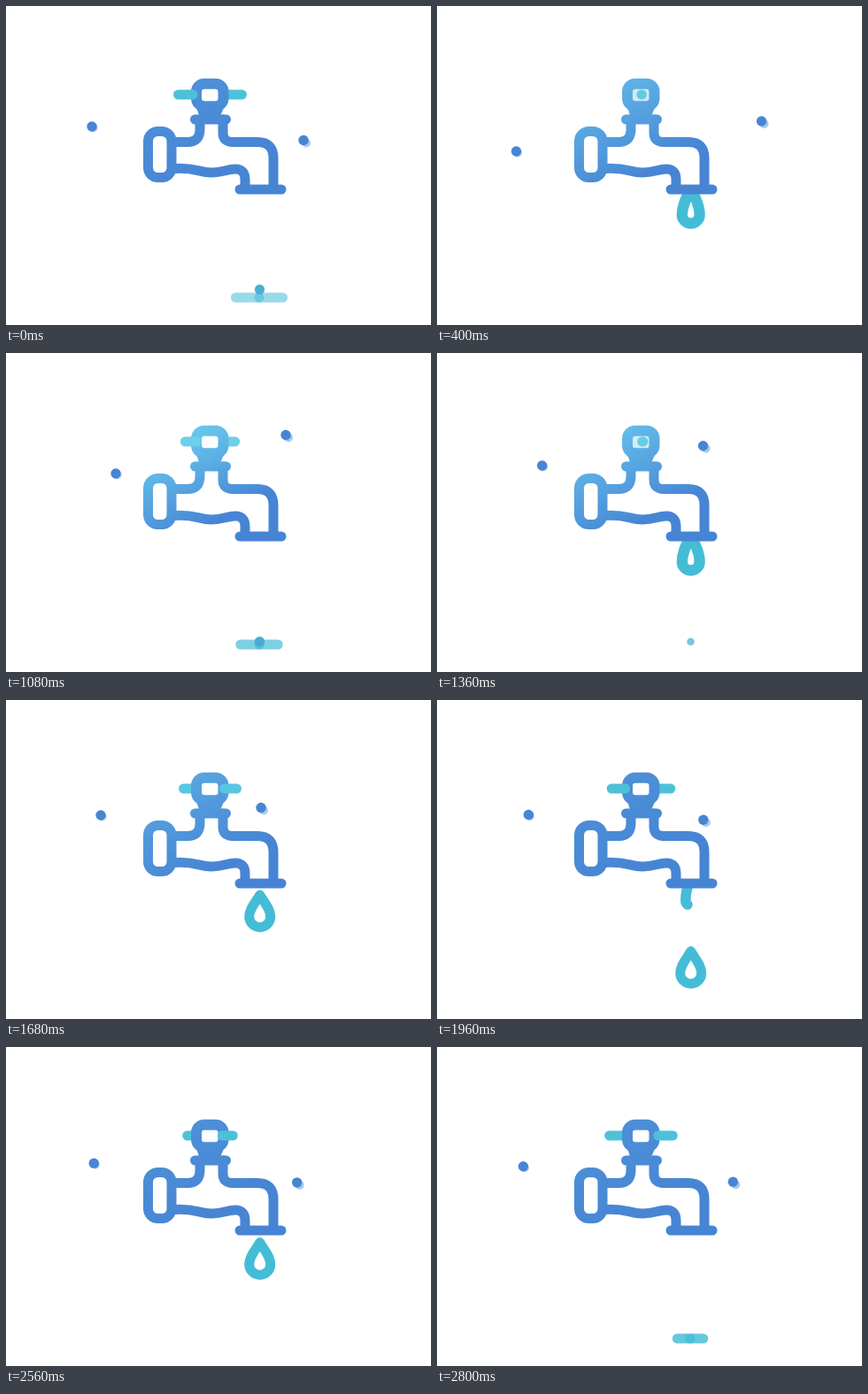
An HTML page for the animation above (2840 ms loop, 480x360 px).

```html
<!DOCTYPE html>
<html lang="en">
<head>
<meta charset="utf-8">
<title>Dripping tap</title>
<style>
  html, body { margin: 0; width: 100%; height: 100%; overflow: hidden; background: #fff; }
  svg { display: block; width: 100vw; height: 100vh; }
  .line { fill: none; stroke-width: 11; stroke-linecap: round; stroke-linejoin: round; }
  .water { stroke: #45bcd6; }
  .dot { fill: #4785d4; }
  .echo { fill: #a9c9ee; }
</style>
</head>
<body>
<svg viewBox="0 0 480 360">
  <defs>
    <linearGradient id="metal" gradientUnits="userSpaceOnUse" x1="200" y1="85" x2="250" y2="182">
      <stop id="shine" offset="0"/>
      <stop offset="1" stop-color="#4785d4"/>
    </linearGradient>
    <clipPath id="below"><path d="M0 207H480V360H0Z"/></clipPath>
  </defs>
  <g id="drips" clip-path="url(#below)"></g>
  <g id="back"></g>
  <g class="line" stroke="url(#metal)">
    <rect x="160.500" y="141.500" width="26.500" height="52" rx="11"/>
    <path d="M190 153.500H205Q219 153.500 219 139V128M245 128V143Q245 153.500 256 153.500H284Q302 153.500 302 172V206"/>
    <path d="M190 183.500C214 182 218 188 232 188S249 184 259 184Q270 184 270 196V206"/>
    <path d="M213.500 128H248.500M264 207H311"/>
    <path d="M221 115H240L236 124H224Z"/>
    <rect id="knob" x="215" y="87.700" width="30.500" height="25.500" rx="9" stroke-width="12"/>
  </g>
  <g id="front"></g>
  <g id="dots"></g>
</svg>
<script>
const LOOP = 2840, STEP = 40;
const SPLASHES = [1020, 1980, 2760];

const $ = id => document.getElementById(id);
const clamp = v => Math.min(1, Math.max(0, v));
const lerp = (a, b, k) => a + (b - a) * k;
const mix = (a, b, k) => `rgb(${a.map((v, i) => Math.round(lerp(v, b[i], k)))})`;
const easeOut = k => Math.sin(k * Math.PI / 2);

function set(el, attrs) {
  for (const key in attrs) el.setAttribute(key, attrs[key]);
  return el;
}
function add(parent, tag, attrs) {
  const el = document.createElementNS("http://www.w3.org/2000/svg", tag);
  parent.append(el);
  return set(el, attrs);
}

// Closed smooth curve through [time, x, y] keys.
function along(keys, t) {
  const n = keys.length;
  const key = j => {
    const [at, x, y] = keys[(j + n) % n];
    return [at + LOOP * Math.floor(j / n), x, y];
  };
  const i = keys.findLastIndex(k => k[0] <= t);
  const [p, a, b, q] = [-1, 0, 1, 2].map(d => key(i + d));
  const h = b[0] - a[0], u = (t - a[0]) / h;
  return [1, 2].map(c => {
    const m = h * (b[c] - p[c]) / (b[0] - p[0]);
    const k = h * (q[c] - a[c]) / (q[0] - a[0]);
    const d = b[c] - a[c];
    return a[c] + u * (m + u * (3 * d - 2 * m - k + u * (m + k - 2 * d)));
  });
}

const dots = [
  { lag: 1.5, keys: [[0, 97, 136], [400, 89.5, 164], [720, 95, 210], [1080, 124, 136], [1680, 107, 130], [2280, 101, 130.5]] },
  { lag: 3, keys: [[0, 336, 151.5], [400, 366.5, 130], [560, 330, 99], [720, 318, 93], [1080, 316, 92.5], [1680, 288, 121.5], [2280, 322, 148]] }
];
for (const d of dots) {
  d.echo = add($("dots"), "circle", { class: "echo", r: 5 });
  d.dot = add($("dots"), "circle", { class: "dot", r: 5.7 });
}
const bars = ["back", "front"].map(id => add($(id), "line", { class: "line", y1: 100, y2: 100 }));
const drips = SPLASHES.map(at => {
  const shape = (tag, attrs) => add($("drips"), tag, attrs);
  const half = () => shape("line", { class: "line water", x1: 286, y1: 329, y2: 329 });
  return {
    at,
    pool: [half(), half()],
    hop: shape("circle", { cx: 286.5, fill: "#48aad2" }),
    drop: shape("path", { class: "line water", pathLength: 1 })
  };
});

function dropPath(tip, y, r) {
  const x = 286.7, bend = (y - tip) * .35;
  return `M${x} ${tip}C${x - 5} ${tip + bend} ${x - r} ${y - bend} ${x - r} ${y}` +
    `A${r} ${r} 0 0 0 ${x + r} ${y}C${x + r} ${y - bend} ${x + 5} ${tip + bend} ${x} ${tip}`;
}

// s is the time relative to the splash: grow, settle, fall, spread, bounce.
function drawDrip({ at, pool, hop, drop }, t) {
  const s = (t - at + 940 + LOOP) % LOOP - 940;
  const grow = clamp((s + 930) / 450);
  const settle = clamp((s + 480) / 180);
  const fall = 77 * clamp((s + 220) / 220) ** 2;
  const tip = lerp(201, 208, grow) + 12 * settle + fall;
  const belly = lerp(220, 242.5, grow) + 2 * settle + fall;
  set(drop, {
    d: dropPath(tip, belly, lerp(3, 13, grow) - settle),
    "stroke-dasharray": grow < 1 ? `${easeOut(grow)} 2` : "none",
    style: `stroke-width: ${11 + 2 * (grow - settle)}px`,
    visibility: grow > 0 && s <= 0 ? "visible" : "hidden"
  });

  const spread = clamp(s / 140);
  pool.forEach((el, i) => set(el, {
    x2: 286 + (i ? 1 : -1) * 34 * easeOut(spread),
    opacity: s > 0 ? 1 - spread ** 1.4 : 0
  }));

  const q = clamp((s - 50) / 300);
  set(hop, {
    cy: 329 - 100 * q * (1 - q),
    r: 5.8 - 1.6 * q,
    opacity: q > 0 && q < 1 ? 1 - .3 * q : 0
  });
}

// The handle turns half a revolution in a third of the loop.
function drawHandle(t, shine) {
  const p = t * 3 / LOOP % 1;
  const turn = Math.cos(Math.PI * p + .28 * Math.sin(Math.PI * p ** .6));
  const stroke = mix([72, 191, 214], [110, 207, 234], shine);
  bars.forEach((bar, i) => {
    const x = (i ? -36 : 36) * turn;
    set(bar, { x1: 230.5 + x * .54, x2: 230.5 + x, stroke });
  });
  set($("knob"), { fill: mix([255, 255, 255], [205, 233, 245], (1 - Math.abs(turn)) ** 2) });
}

function draw(now) {
  const t = Math.floor(now % LOOP / STEP) * STEP;
  const shine = .15 + .85 * Math.sin(Math.PI * clamp(t / 1900));
  set($("shine"), { "stop-color": mix([71, 133, 212], [108, 205, 240], shine) });
  drawHandle(t, shine);
  drips.forEach(d => drawDrip(d, t));
  for (const { keys, lag, dot, echo } of dots) {
    const [cx, cy] = along(keys, t);
    set(dot, { cx, cy });
    set(echo, { cx: cx + lag, cy: cy + lag });
  }
}

let start;
function tick(now) {
  start ??= now;
  draw(now - start);
  requestAnimationFrame(tick);
}
draw(0);
requestAnimationFrame(tick);
</script>
</body>
</html>
```
